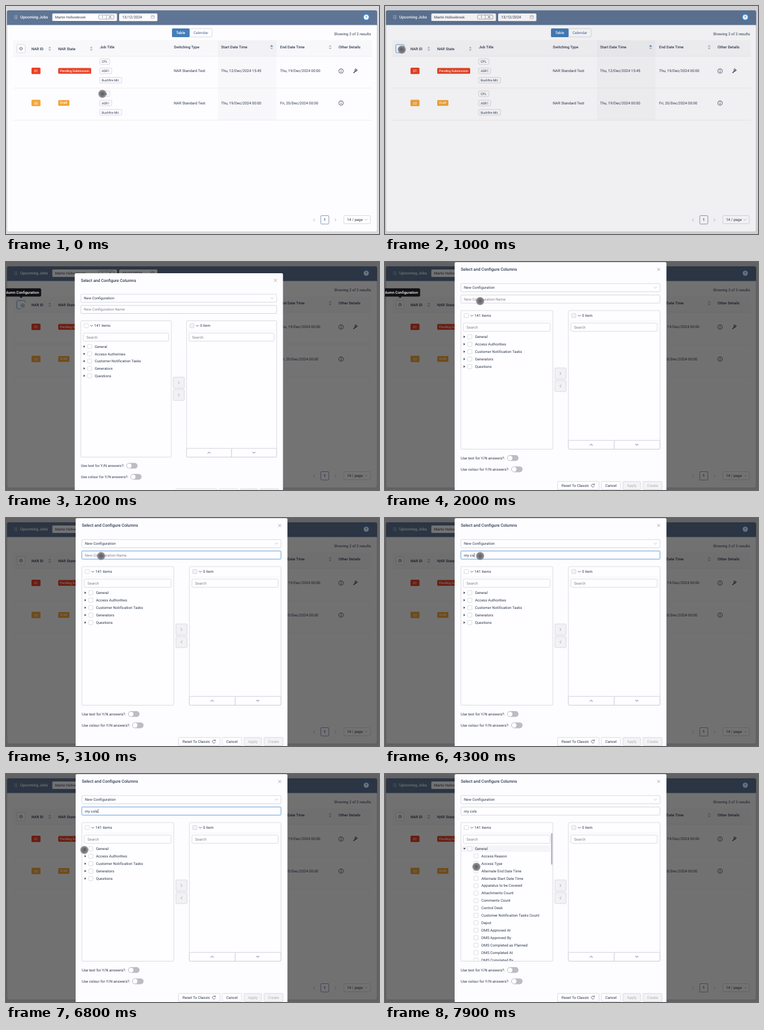
Recreate the animation shown at these times as an HTML page. Size 600 by 366 pixels, loop 8000 ms.

```html
<!DOCTYPE html>
<html lang="en">
<head>
<meta charset="utf-8">
<title>Configure columns</title>
<style>
html, body { margin: 0; width: 100%; height: 100%; overflow: hidden; background: #dad9dd; }
svg { display: block; width: 600px; height: 366px; }
text { font-family: Roboto, "Liberation Sans", sans-serif; font-size: 6px; fill: #2f3d52; text-rendering: geometricPrecision; white-space: pre; }
.line { fill: none; stroke-linecap: round; stroke-linejoin: round; }
</style>
</head>
<body>
<svg id="stage" viewBox="0 0 600 366">
  <defs>
    <radialGradient id="dot">
      <stop offset="0" stop-color="#4c4b50" stop-opacity=".9"/>
      <stop offset=".6" stop-color="#68676c" stop-opacity=".88"/>
      <stop offset="1" stop-color="#85848a" stop-opacity=".8"/>
    </radialGradient>
    <clipPath id="treeClip"><rect x="122" y="112" width="148" height="188"/></clipPath>
  </defs>
  <g id="page"></g>
  <rect id="mask" width="600" height="366" fill="#000"/>
  <g id="tip"></g>
  <g id="modal"></g>
  <circle id="cursor" r="6.2" fill="url(#dot)" stroke="#6b6a70" stroke-opacity=".6" stroke-width=".6"/>
</svg>
<script>
const $ = id => document.getElementById(id);
const DURATION = 8000, STEP = 100;

// Markup helpers; boxes take left, top, right, bottom and text is centred on cy.
const box = (l, t, r, b, fill, stroke = 'none', rx = 1.5, more = '') =>
  `<rect x="${l}" y="${t}" width="${r - l}" height="${b - t}" rx="${rx}" fill="${fill}" stroke="${stroke}" stroke-width=".7" ${more}/>`;
const text = (x, cy, str, { size = 6, fill = '#2f3d52', weight = 400, anchor = 'start', id = '' } = {}) =>
  `<text ${id && `id="${id}"`} x="${x}" y="${cy + size * 0.355}" text-anchor="${anchor}" style="font-size:${size}px;fill:${fill};font-weight:${weight}">${str}</text>`;
const line = (d, stroke = '#43536a', width = .8) =>
  `<path class="line" d="${d}" stroke="${stroke}" stroke-width="${width}"/>`;
const shape = (d, fill) => `<path d="${d}" fill="${fill}"/>`;
const ring = (x, y, r, stroke, fill = 'none') =>
  `<circle cx="${x}" cy="${y}" r="${r}" fill="${fill}" stroke="${stroke}" stroke-width=".8"/>`;
const chevron = {
  down: (x, y, c, s = 2) => line(`M${x - s} ${y - s / 2}l${s} ${s}l${s} ${-s}`, c),
  up: (x, y, c, s = 2) => line(`M${x - s} ${y + s / 2}l${s} ${-s}l${s} ${s}`, c),
  left: (x, y, c, s = 2) => line(`M${x + s / 2} ${y - s}l${-s} ${s}l${s} ${s}`, c),
  right: (x, y, c, s = 2) => line(`M${x - s / 2} ${y - s}l${s} ${s}l${-s} ${s}`, c)
};
const check = (x, cy, fill = '#fff') => box(x, cy - 3.4, x + 6.8, cy + 3.4, fill, '#cfced6', 1.2);
const sorter = (x, y, active) =>
  shape(`M${x - 2.4} ${y - .8}h4.8l-2.4 -2.8z`, active ? '#3f7fc4' : '#bab9c2') +
  shape(`M${x - 2.4} ${y + .9}h4.8l-2.4 2.8z`, '#bab9c2');
const info = (x, y) => ring(x, y, 3.6, '#3d4a5e') +
  line(`M${x} ${y - .3}v2`, '#3d4a5e', .8) + line(`M${x} ${y - 1.9}v.1`, '#3d4a5e', .9);
const centred = (l, t, r, b, label, on = true) =>
  box(l, t, r, b, on ? '#fefdff' : '#f3f2f5', '#d0cfd7', 1.5) +
  text((l + r) / 2, (t + b) / 2, label, { anchor: 'middle', fill: on ? '#2f3d52' : '#b0afb7' });

function tableRow(cy, colour, id, state, stateRight, start, end) {
  const white = { size: 5.1, fill: '#fff', weight: 500, anchor: 'middle' };
  const tags = [['CPL', 167], ['ASR1', 170], ['Bushfire Mit.', 186]];
  return box(41, cy - 5.2, 55.5, cy + 5, colour) + text(48.2, cy, id, white) +
    box(84, cy - 4.8, stateRight, cy + 4.4, colour) + text((84 + stateRight) / 2, cy - .3, state, white) +
    tags.map(([label, right], i) => {
      const y = cy + (i - 1) * 14.9;
      return box(150.8, y - 4.6, right, y + 4.4, '#fcfbfe', '#cdccd5') + text(154, y, label, { size: 5.1 });
    }).join('') +
    text(270, cy, 'NAR Standard Test') + text(346, cy, start) + text(441, cy, end) +
    info(539, cy) + line(`M12 ${cy + 27.5}H588`, '#eae9ee', .7);
}

function drawPage() {
  const head = { weight: 500, size: 6.05 };
  let s = box(0, 0, 600, 366, '#dad9dd', 'none', 0) + box(1.5, 7, 597, 362.5, '#fdfcfe', '#c4c3ca', 3) +
    shape('M1.5 30V9.5q0 -2.5 2.5 -2.5H594.500q2.500 0 2.500 2.500V30z', '#5f7595') +
    line('M2 30.300H597', '#4f6586', .6);
  s += [15.8, 18, 20.2].map(y => line(`M13.300 ${y}h.2M15 ${y}h3`, '#dce3ee', .6)).join('') +
    text(23, 18, 'Upcoming Jobs', { fill: '#fff', weight: 500, size: 6.35 });
  s += box(74.5, 12, 178.5, 24, '#fefdff') + text(79, 18, 'Martin Hollowbrook'.slice(0, 18), { size: 5.6 }) +
    box(149, 14.3, 173.5, 21, '#fff', '#7c8798') + line('M161.300 14.500V21', '#7c8798', .6) +
    text(155.2, 17.6, 'i', { size: 5, weight: 500, anchor: 'middle' }) +
    line('M165.700 16l3.400 3.400m0 -3.400l-3.400 3.400', '#2f3d52', .7);
  s += box(182, 12, 243.5, 24.3, '#fefdff') + text(187, 18, '13/12/2024') +
    box(233.500, 15.6, 238.500, 20.3, 'none', '#a9a8b2', .6) + line('M233.500 17.300h5M234.900 14.900v1.300M237.100 14.900v1.300', '#a9a8b2', .6);
  s += ring(579.5, 18, 5.7, '#3f83cd', '#3f83cd') + ring(579.5, 17.9, 3.7, '#fff', '#fff') +
    text(579.5, 18, '?', { size: 6, weight: 700, fill: '#3f83cd', anchor: 'middle' });

  s += box(295, 36.3, 331.5, 49.700, '#fefdff', '#cfced7') + box(267, 36, 295.3, 50, '#457db9') +
    text(281, 43, 'Table', { fill: '#fff', weight: 500, anchor: 'middle' }) +
    text(313.3, 43, 'Calendar', { fill: '#4a6c9c', anchor: 'middle' }) +
    text(587, 45.3, 'Showing 2 of 2 results', { anchor: 'end' });

  s += box(12, 55, 588, 80.700, '#f8f7fa', 'none', 2) + box(341, 55, 435, 80.700, '#f2f1f4', 'none', 0) +
    box(341, 80.700, 435, 183, '#f8f7fa', 'none', 0) + line('M12 80.700H588', '#eae9ee', .7) +
    `<rect id="gear" x="17.500" y="62" width="13.300" height="13" rx="1.500" fill="#fefdff" stroke-width=".8"/>` +
    ring(24.1, 68.5, 1.7, '#59677b') +
    `<circle cx="24.100" cy="68.500" r="2.600" fill="none" stroke="#59677b" stroke-width=".8" stroke-dasharray="1 1.040"/>`;
  s += text(41, 68.5, 'NAR ID', head) + text(84, 68.5, 'NAR State', head) +
    [[151, 'Job Title'], [270, 'Switching Type'], [346, 'Start Date Time'], [441, 'End Date Time'], [535, 'Other Details']]
      .map(([x, label]) => text(x, 66, label, head)).join('') +
    sorter(70.3, 68.5) + sorter(137.2, 68.5) + sorter(427.3, 66, true) + sorter(521.5, 66);
  s += tableRow(104.300, '#e84226', '21', 'Pending Submission', 137, 'Thu, 12/Dec/2024 15:45', 'Thu, 19/Dec/2024 00:00') +
    tableRow(155.800, '#f0a63c', '22', 'Draft', 102, 'Thu, 19/Dec/2024 00:00', 'Fri, 20/Dec/2024 00:00') +
    line('M559.500 107l3.300 -3.300', '#3d4a5e', 1.5) + line('M565 102.700a2 2 0 1 1 -2 -2l.3 1.600z', '#3d4a5e', .9);

  s += chevron.left(495.5, 343.3, '#a9a8b2') + box(506.3, 336.5, 519.300, 350, '#fefdff', '#5c7ca8') +
    text(512.8, 343.3, '1', { weight: 500, anchor: 'middle' }) + chevron.right(530, 343.3, '#a9a8b2') +
    box(543.5, 336.5, 586, 349.500, '#fefdff', '#cfced7') + text(548.5, 343, '14 / page') + chevron.down(579, 343, '#bab9c2');
  $('page').innerHTML = s;
}

function drawTip() {
  $('tip').innerHTML = box(-14, 42.3, 56.5, 55.5, '#111014', 'none', 2) +
    shape('M21.500 55.300h5.600l-2.800 2.800z', '#111014') +
    text(53, 49, 'Column Configuration', { fill: '#f4f3f6', anchor: 'end', weight: 500 });
}

const groups = ['General', 'Access Authorities', 'Customer Notification Tasks', 'Generators', 'Questions'];
const fields = ['Access Reason', 'Access Type', 'Alternate End Date Time', 'Alternate Start Date Time',
  'Apparatus to be Covered', 'Attachments Count', 'Comments Count', 'Control Desk',
  'Customer Notification Tasks Count', 'Depot', 'DMS Approved At', 'DMS Approved By',
  'DMS Completed as Planned', 'DMS Completed At', 'DMS Completed By'];

function transferPanel(l, r, label, off) {
  return box(l, 78, r, 300.5, '#fefdff', '#cfced7', 1.5) +
    check(l + 5.3, 86, off ? '#f3f2f5' : '#fff') + chevron.down(l + 17.500, 86.200, '#43536a', 1.9) +
    text(l + 22, 86, label) + line(`M${l} 94.500H${r}`, '#f1f0f4', .6) +
    box(l + 4, 98, r - 4.3, 111.300, '#fefdff', '#cfced7') + text(l + 9, 104.700, 'Search', { fill: '#85848e' });
}

function drawModal() {
  const toggle = (x, cy) => box(x, cy - 4.6, x + 18.3, cy + 4.600, '#bdbcc4', 'none', 4.6) +
    `<circle cx="${x + 4.700}" cy="${cy}" r="3.700" fill="#fff"/>`;
  let s = box(112, .3, 452.700, 400, '#fdfcfe', 'none', 2) +
    text(122, 12, 'Select and Configure Columns', { weight: 500, size: 6.7 }) +
    line('M438.300 10l4 4m0 -4l-4 4', '#8c8b95', .7) +
    box(122, 34.700, 442.300, 47.700, '#fefdff', '#cfced7') + text(127, 41.2, 'New Configuration') +
    chevron.down(435, 41.200, '#bab9c2') +
    `<rect id="glow" x="121.300" y="52.300" width="321.700" height="14.400" rx="2" fill="#d3e5f6"/>` +
    `<rect id="field" x="122" y="53" width="320.300" height="13" rx="1.500" fill="#fefdff" stroke-width=".8"/>` +
    text(127, 59.4, 'New Configuration Name', { id: 'hint', fill: '#85848e' }) +
    text(127, 59.4, '', { id: 'typed' }) +
    `<path id="caret" d="M0 56.300v6.700" stroke="#222b38" stroke-width=".6"/>`;
  s += transferPanel(122, 270, '141 items', false) + transferPanel(295, 442.300, '0 item', true);

  s += '<g id="closed">' + groups.map((name, i) => {
    const y = 120 + i * 11.950;
    return shape(`M126.500 ${y - 1.900}l2.500 1.900l-2.500 1.900z`, '#2f3d52') + check(133, y) + text(144.7, y, name);
  }).join('') + '</g>';
  s += '<g id="open" clip-path="url(#treeClip)">' + box(123, 114.800, 266, 125, '#f5f4f7', 'none', 1) +
    shape('M125.900 118.700h3.800l-1.900 2.600z', '#2f3d52') + check(133, 120) + text(144.700, 120, 'General') +
    fields.map((name, i) => check(143, 131.600 + i * 11.930) + text(155, 131.600 + i * 11.930, name)).join('') + '</g>' +
    box(267, 95, 269.500, 145.500, '#b9b8bf', 'none', 1.2, 'id="scroll"');

  s += box(273.300, 170, 291.300, 188, '#f2f1f4', '#cfced7') + chevron.right(282.3, 179, '#9c9ba5') +
    box(273.300, 190, 291.300, 208, '#f2f1f4', '#cfced7') + chevron.left(282.3, 199, '#9c9ba5') +
    box(295, 286.300, 368.700, 300.500, '#fefdff', '#c4c3cd') + chevron.up(331.700, 293.300, '#43536a') +
    box(368.700, 286.300, 442.300, 300.500, '#fefdff', '#c4c3cd') + chevron.down(405, 293.300, '#43536a');
  s += text(122, 314.5, 'Use text for Y/N answers?:') + toggle(196.500, 314.700) +
    text(122, 332.6, 'Use colour for Y/N answers?:') + toggle(203, 332.800);
  s += box(277.5, 352.300, 344.300, 365.500, '#fefdff', '#cfced7') + text(284, 358.9, 'Reset To Classic') +
    line('M336.600 357.400a2.500 2.500 0 1 0 .2 2.500M336.900 355.900v1.700h-1.700', '#43536a', .7) +
    centred(348, 352.300, 379, 365.500, 'Cancel') + centred(383, 352.300, 411, 365.500, 'Apply', false) +
    centred(415, 352.300, 445.700, 365.500, 'Create', false);
  $('modal').innerHTML = s;
}

// Tracks: [time, values...] with eased travel between entries.
const cursorTrack = [[0, 155, 141], [200, 155, 141], [900, 27, 70], [1500, 27, 70], [1900, 153, 63], [2400, 153, 61],
  [5600, 153, 61], [6500, 126, 122], [7200, 126, 122], [7700, 147, 149]];
const zoomTrack = [[1000, 0], [1100, .8], [1200, .979], [1300, 1]];
const scrollTrack = [[1200, 16.5], [1600, 0]];
const keyTimes = [3500, 3700, 3900, 4000, 4200, 4500, 4700];
const phrase = 'my cols';

const smooth = u => u * u * (3 - 2 * u);
function sample(track, t) {
  const next = track.findIndex(k => k[0] > t);
  if (next === 0) return track[0].slice(1);
  if (next < 0) return track[track.length - 1].slice(1);
  const a = track[next - 1], b = track[next];
  const u = smooth((t - a[0]) / (b[0] - a[0]));
  return a.slice(1).map((v, i) => v + (b[i + 1] - v) * u);
}
const show = (id, on) => $(id).setAttribute('visibility', on ? 'visible' : 'hidden');

function render(t) {
  const [x, y] = sample(cursorTrack, t);
  $('cursor').setAttribute('transform', `translate(${x} ${y})`);

  const [zoom] = sample(zoomTrack, t);
  const [scroll] = sample(scrollTrack, t);
  const scale = .2 + .8 * zoom;
  $('mask').setAttribute('opacity', t < 1000 ? 0 : .05 + .5 * zoom);
  $('modal').setAttribute('opacity', Math.min(1, zoom * 1.05));
  $('modal').setAttribute('transform', `translate(27 ${70 + scroll}) scale(${scale}) translate(-27 -70)`);
  $('gear').setAttribute('stroke', t >= 900 && t < 1600 ? '#4a86c6' : '#d3d2da');
  show('tip', t >= 1200 && t < 2200);

  const focused = t >= 2600 && t < 7100;
  const count = keyTimes.filter(k => k <= t).length;
  const lastKey = count ? keyTimes[count - 1] : 2600;
  $('typed').textContent = phrase.slice(0, count);
  $('field').setAttribute('stroke', focused ? '#5e9bd6' : '#cfced7');
  show('glow', focused);
  show('hint', count === 0);
  show('caret', focused && (t - lastKey) % 1000 < 500);
  const width = count ? $('typed').getComputedTextLength() : 0;
  $('caret').setAttribute('transform', `translate(${127.4 + width} 0)`);

  const expanded = t >= 7200;
  show('closed', !expanded);
  show('open', expanded);
  show('scroll', expanded);
}

drawPage();
drawTip();
drawModal();
const began = performance.now();
function tick() {
  const t = (performance.now() - began) % DURATION;
  render(Math.floor(t / STEP) * STEP);
  requestAnimationFrame(tick);
}
tick();
</script>
</body>
</html>
```
